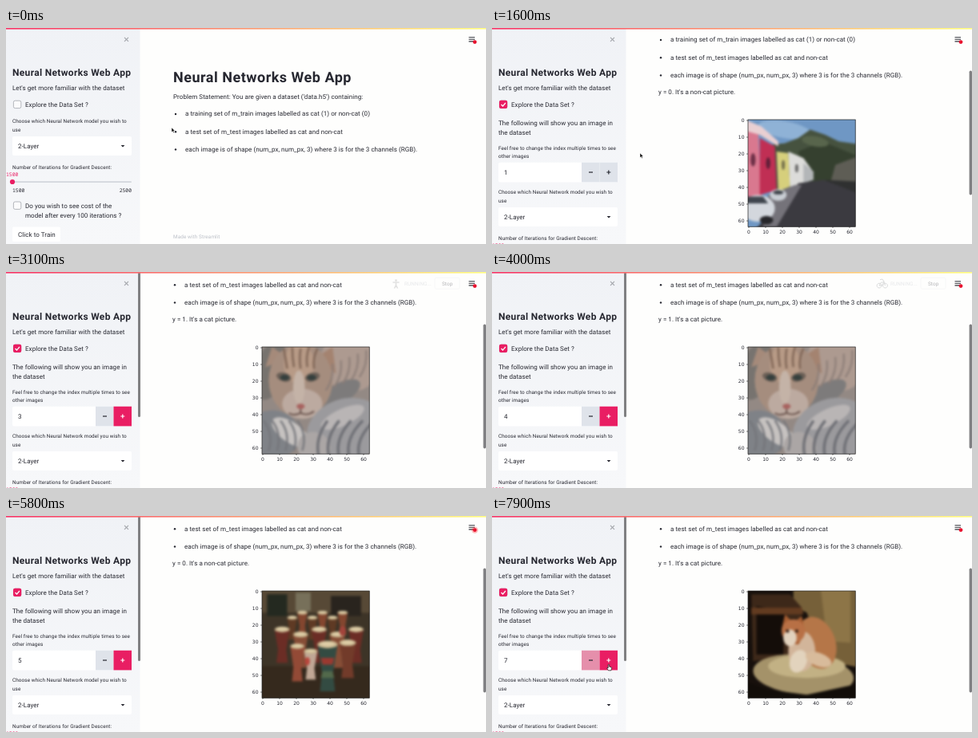
An HTML page for the animation above (8000 ms loop, 600 px wide and 271 px high).

```html
<!DOCTYPE html>
<html lang="en">
<head>
<meta charset="utf-8">
<title>Neural Networks Web App</title>
<style>
  html, body { margin: 0; width: 100%; height: 100%; overflow: hidden; background: #fefefd; }
  svg { display: block; width: 600px; height: 271px; }
  text { font: 8px Roboto, sans-serif; letter-spacing: .055px; fill: #262730; white-space: pre; text-rendering: geometricPrecision; }
  .h1 { font-size: 18px; font-weight: 700; letter-spacing: .5px; }
  .h2 { font-size: 12px; font-weight: 700; letter-spacing: .32px; }
  .small { font-size: 6.4px; letter-spacing: .09px; }
  .mono { font: 6.4px "Noto Sans Mono", "DejaVu Sans Mono", monospace; letter-spacing: 0; }
  .tick { font: 6px "DejaVu Sans", sans-serif; letter-spacing: 0; }
  .pink { fill: #e91e63; }
  .pale { fill: #bcc0c8; }
  .end { text-anchor: end; }
  .mid { text-anchor: middle; }
</style>
</head>
<body>
<svg id="stage" viewBox="0 0 600 271"></svg>
<script>
const LOOP = 8000, STEP = 100, PINK = '#e91e63';

const text = (x, y, s, cls = '') => `<text x="${x}" y="${y}" class="${cls}">${s}</text>`;
const rect = (x, y, w, h, fill, extra = '') =>
  `<rect x="${x}" y="${y}" width="${w}" height="${h}" fill="${fill}" ${extra}/>`;
const line = (d, color, w = 1) => `<path d="${d}" fill="none" stroke="${color}" stroke-width="${w}"/>`;
const group = (id, body, extra = '') => `<g id="${id}" ${extra}>${body}</g>`;
const box = y => rect(9.4, y, 9.4, 9.4, '#fbfbfc', 'rx="2" stroke="#a3a6ad" stroke-width=".8"');

// Picture parts on a 64 x 64 grid: polygons and tilted ellipses
const poly = (fill, points) => `<polygon fill="${fill}" points="${points}"/>`;
const oval = (fill, x, y, rx, ry, turn = 0) =>
  `<ellipse fill="${fill}" cx="${x}" cy="${y}" rx="${rx}" ry="${ry}" transform="rotate(${turn} ${x} ${y})"/>`;
const ground = fill => rect(-4, -4, 72, 72, fill);

function street() {
  return ground('#6f97c4') +
    oval('#8fb2d6', 22, 6, 16, 5, 10) +
    poly('#46523f', '14,15 22,14 30,11 37,6 46,9 54,13 68,15 68,42 14,42') +
    poly('#35402f', '30,19 44,13 66,22 66,38 32,37') + oval('#58654c', 40, 13, 8, 3, 10) +
    poly('#d9788f', '-4,2 6,5 8,47 -4,50') +
    poly('#e9cfd2', '-4,-1 8,4 18,13 18,16 7,9 -4,6') +
    poly('#c02f54', '7,11 16,16 17,42 7,45') +
    poly('#d6cf7c', '17,19 24,20 25,40 18,43') +
    poly('#dcdcda', '24,19 33,23 38,30 38,36 25,41') +
    poly('#b3b6b8', '33,26 39,31 39,36 33,38') +
    poly('#5e5d55', '52,27 68,21 68,46 49,38') + poly('#2f3030', '46,36 66,37 66,45 50,41') +
    poly('#3b3a40', '30,38 45,36 68,45 68,68 2,68') +
    poly('#75737a', '12,45 28,39 32,39 17,64 9,64') +
    oval('#6d3047', 3, 24, 1.5, 4) + oval('#5f1f38', 12, 26, 1.3, 3.5) +
    oval('#74704a', 21, 27, 1, 3) + oval('#6b6b6b', 29, 29, 1, 2.5) +
    oval('#c9ced4', 18, 45, 5, 3.5) + oval('#3d4248', 18, 43.5, 3, 1.2) +
    oval('#d3d7dd', 6, 53, 10, 8) + poly('#3f454e', '-2,46 9,46 12,50 -2,50') +
    oval('#26262a', 11, 60, 4, 2.5);
}

function tabby() {
  let s = ground('#938984') +
    oval('#ad9a90', 52, 10, 18, 16, 30) + oval('#7d7b7b', 46, 28, 14, 6, -30) +
    oval('#77736f', 5, 14, 9, 18, 15) + poly('#a58a7a', '2,12 6,0 16,7') + poly('#a48370', '31,7 42,0 44,16') +
    oval('#a58d7e', 23, 20, 19, 22) + oval('#b79a86', 22, 10, 9, 12) +
    oval('#bcaaa0', 24, 34, 12, 9) + oval('#c4b3a7', 22, 24, 3.5, 10) +
    oval('#9b9a9d', 50, 50, 24, 19, -20) + oval('#b9b5b5', 48, 42, 14, 5, -25) +
    oval('#7f8287', 7, 52, 16, 14, 15) + oval('#c6c2c0', 17, 51, 13, 6, 35) +
    oval('#aba6a5', 31, 60, 10, 9, 20);
  for (let i = 0; i < 5; i++)
    s += line(`M${15 + i * 4} ${13 - i % 2} q-1 -6 ${i - 2} -12`, '#7c6253', 1.1) +
      line(`M${34 + i * 6} 66 q-3 -11 ${5 + i} -22`, '#6d6e74', 1.6) +
      line(`M${1 + i * 5} 44 q6 8 3 18`, '#74757a', 1.1) +
      line(`M${38 + i * 5} ${26 - i * 2} q5 -7 4 -16`, '#8b7d77', 1);
  return s + oval('#6a5f56', 13, 18, 4.5, 2.6, 15) + oval('#6a5f56', 30, 18, 4.5, 2.6, -15) +
    oval('#353f3d', 13.5, 18.3, 2.8, 1.7) + oval('#353f3d', 29.5, 18.3, 2.8, 1.7) +
    oval('#a8625f', 23, 35.5, 2.4, 1.6) + line('M23 37 v2.5 q-4 2 -7 0 M23 39.5 q4 2 8 -1', '#665049', .9);
}

function lily() {
  return ground('#0b0e08') +
    oval('#22371b', 8, 14, 5, 12, -25) + oval('#2c4721', 52, 57, 4, 14, 60) +
    oval('#26401c', 18, 56, 4, 15, 50) + oval('#1c2f16', 34, 59, 10, 4, 10) +
    oval('#4e7134', 33, 11, 3.5, 10, 12) + oval('#3a5a29', 30, 5, 2, 8, -10) +
    oval('#718c42', 26, 20, 5.5, 8, -35) + oval('#a5b268', 28, 19, 2, 6, -35) +
    oval('#a7b467', 10, 32, 5.5, 14, -28) + oval('#e0dcae', 11, 32, 2.6, 11, -28) +
    oval('#b9bba0', 25, 30, 10, 3.5, 15) + oval('#e2dedb', 26, 29, 8, 2, 15) +
    oval('#d4d0cd', 53, 27, 12, 4, -8) + oval('#eeeae8', 50, 25.5, 10, 2, -10) +
    oval('#c9c6c0', 33, 48, 5, 14, 12) + oval('#eae6df', 33, 46, 2.8, 12, 12) +
    oval('#d2cec9', 49, 39, 12, 5, 22) + oval('#eeebe8', 44, 38, 8, 3.5, 15) +
    oval('#e6e3d6', 36, 35, 8, 5, 20) + oval('#a3ad6f', 35, 36, 5, 2, 25) +
    oval('#7c2630', 44, 29, 4, 1.8, -25) + oval('#9a3b40', 53, 31, 4.5, 2, 20) +
    oval('#752530', 48, 35, 5.5, 1.7, 15);
}

function drum(x, y, w, h, body) {
  return poly(body, `${x - w},${y} ${x + w},${y} ${x + w * .55},${y + h * .6} ${x + w * .75},${y + h} ` +
    `${x - w * .75},${y + h} ${x - w * .55},${y + h * .6}`) +
    oval('#c7b58e', x, y, w, w * .38) + oval('#dfcea7', x, y - .3, w * .75, w * .23);
}

function drums() {
  let s = ground('#3d3427') + rect(-4, -4, 72, 17, '#574936') + rect(-4, 45, 72, 24, '#35291d') +
    rect(3, 2, 12, 13, '#242920') + rect(20, 1, 9, 11, '#77705a') + rect(41, 3, 18, 12, '#29241e');
  for (let i = 0; i < 6; i++) s += drum(18 + i * 6, 16 - i % 2 * 3, 3, 13, i % 2 ? '#83462f' : '#5f3a24');
  for (let i = 0; i < 5; i++) s += drum(12 + i * 11, 23 + i % 2 * 3, 4.5, 20, i % 2 ? '#864d36' : '#6b2d25');
  return s + drum(21, 33, 4.2, 21, '#934a36') + drum(29, 36, 4, 17, '#c0a795') +
    drum(51, 31, 5, 21, '#723b2a') + drum(39, 32, 6, 28, '#334b42') +
    poly('#9a3930', '35,40 43,40 42,44 36,44') + poly('#52694b', '36,48 42,48 43,52 35,52') +
    oval('#b8463c', 27, 42, 1.5, 2.5) + oval('#a2443b', 48, 24, 2, 3);
}

function ginger() {
  return ground('#17100c') +
    poly('#766039', '27,-4 68,-4 68,46 46,42 35,13 27,9') +
    poly('#8d7547', '43,-4 61,-4 61,31 47,30') +
    poly('#3d2819', '2,2 25,2 32,10 29,38 3,42') +
    poly('#140d09', '5,9 22,12 21,38 5,38') + poly('#623b20', '2,10 32,10 33,14 2,14') +
    oval('#a49269', 33, 50, 30, 12, 5) + oval('#c2b184', 35, 45, 23, 7) +
    oval('#b57648', 41, 31, 11, 16, -20) + oval('#d2b59a', 32, 36, 8, 12) +
    poly('#a65e32', '20,23 22,14 27,19 32,15 34,25 30,32 22,31') +
    oval('#b87045', 27, 24, 7, 7) + oval('#e1d1bd', 25, 28, 4, 5) +
    oval('#e2d3bd', 30, 42, 5, 7, 20) + oval('#d8bb9b', 42, 41, 8, 4, 20) +
    oval('#392116', 23.5, 24, 1, 1) + oval('#392116', 29, 24, 1, 1) +
    poly('#120d09', '-4,53 12,59 35,62 68,55 68,68 -4,68');
}

const pictures = [
  { at: 0, draw: street, cat: 0 }, { at: 2600, draw: tabby, cat: 1 }, { at: 4400, draw: lily, cat: 0 },
  { at: 5500, draw: drums, cat: 0 }, { at: 7500, draw: ginger, cat: 1 }
];
const runs = [[600, 900], [2200, 2600], [3000, 3500], [3900, 4400], [5000, 5500], [6100, 6800], [7100, 7500]];

// Tables of time and values, linear between rows
const scrollTrack = [[1200, 0], [1400, 46], [1600, 93], [1700, 108], [1800, 114]];
const cursorTrack = [[0, 207, 125], [200, 185, 121], [500, 15, 96], [900, 15, 96], [1200, 185, 157],
  [1700, 185, 157], [2100, 146, 186], [7700, 118, 184], [7800, 125, 185], [7900, 146, 186]];

function track(rows, t) {
  const i = rows.findIndex(r => r[0] > t);
  if (i === 0) return rows[0].slice(1);
  if (i < 0) return rows[rows.length - 1].slice(1);
  const [a, b] = [rows[i - 1], rows[i]], k = (t - a[0]) / (b[0] - a[0]);
  return a.slice(1).map((v, n) => v + (b[n + 1] - v) * k);
}

function plot() {
  let s = '<g transform="translate(320 208) scale(2.1)" clip-path="url(#photo)"><g filter="url(#soft)">';
  pictures.forEach((p, i) => s += group('pic' + i, p.draw()));
  s += '</g></g>' + rect(320, 208, 134.2, 134.2, 'none', 'stroke="#222" stroke-width=".7"');
  for (let n = 0; n <= 60; n += 10) {
    const d = n * 2.1 + 1;
    s += line(`M318 ${208 + d} h2 M${320 + d} 342 v2`, '#222', .6) +
      text(315.5, 210.2 + d, n, 'tick end') + text(320 + d, 351.4, n, 'tick mid');
  }
  return group('plot', s);
}

function mainPane() {
  const items = ['a training set of m_train images labelled as cat (1) or non-cat (0)',
    'a test set of m_test images labelled as cat and non-cat',
    'each image is of shape (num_px, num_px, 3) where 3 is for the 3 channels (RGB).'];
  return group('page',
    group('copy', text(209, 68.4, 'Neural Networks Web App', 'h1') +
      text(209, 88.6, "Problem Statement: You are given a dataset ('data.h5') containing:") +
      items.map((s, i) => `<circle cx="212" cy="${108 + i * 22.2}" r="1.2" fill="#262730"/>` +
        text(224, 110.3 + i * 22.2, s)).join('')) +
    group('result', '<text id="verdict" x="208" y="175.6"></text>' + plot())) +
    group('credit', text(209, 264.2, 'Made with Streamlit', 'small pale')) +
    rect(596.6, 0, 3.4, 156, '#808082', 'id="thumb" rx="1.7"');
}

function numberInput() {
  return rect(8, 168.7, 149, 24.7, '#fff', 'rx="2"') +
    '<text id="value" x="15" y="184"></text>' +
    rect(112, 168.7, 22.5, 24.7, '#dfe3ea', 'id="minus"') + rect(134.5, 168.7, 22.5, 24.7, '#dfe3ea', 'id="plus"') +
    line('M121 181 h5', '#262730', 1.2) +
    group('plusSign', '<path d="M143.3 181 h5 M145.8 178.5 v5" fill="none" stroke-width="1.2"/>');
}

function sidebar() {
  const explore = text(8, 121.6, 'The following will show you an image in') + text(8, 133.8, 'the dataset') +
    text(8, 152.6, 'Feel free to change the index multiple times to see', 'small') +
    text(8, 162.6, 'other images', 'small') + numberInput();
  const lower = text(8, 119.4, 'Choose which Neural Network model you wish to', 'small') +
    text(8, 129.6, 'use', 'small') + rect(8, 136, 149, 24, '#fff', 'rx="2"') + text(15, 151, '2-Layer') +
    poly('#262730', '143.6,147 148.4,147 146,149.6') +
    text(8, 177.4, 'Number of Iterations for Gradient Descent:', 'small') +
    text(0, 186.4, '1500', 'mono pink') + rect(8, 192.2, 149, 1.8, '#d3d6dd', 'rx=".9"') +
    `<circle cx="8" cy="193" r="3.1" fill="${PINK}"/>` +
    text(8, 205.6, '1500', 'mono') + text(157, 205.6, '2500', 'mono end') +
    box(218) + text(24, 225.6, 'Do you wish to see cost of the') +
    text(24, 237.8, 'model after every 100 iterations ?') +
    rect(8, 249.5, 60, 18.5, '#fff', 'rx="2"') + text(15, 261.6, 'Click to Train');
  return rect(0, 0, 167.5, 271, 'url(#panel)') + line('M148 11.8 l5 5 m0 -5 l-5 5', '#a2a4aa', 1.1) +
    text(8, 60.3, 'Neural Networks Web App', 'h2') +
    text(8, 78.2, "Let's get more familiar with the dataset") + box(91.2) +
    group('tickOn', rect(9, 90.8, 10.2, 10.2, PINK, 'rx="2"') + line('M11.5 96 l2 2 l3.4 -4', '#fff', 1.2)) +
    text(24, 98.6, 'Explore the Data Set ?') + group('explore', explore) + group('lower', lower) +
    rect(165, 0, 3, 182, '#808082', 'id="sideThumb" rx="1.5"');
}

function header() {
  const person = '<circle cx="487.5" cy="10.6" r="1.4" fill="#aaa"/>' +
    line('M483.5 13 h8 M487.5 12.5 v4 l-2 4 M487.5 16.5 l2 4', '#aaa', 1.6);
  const bike = line('M484 14.2 a2.9 2.9 0 1 0 .01 0 M491.5 14.2 a2.9 2.9 0 1 0 .01 0 ' +
    'M484 17 l2.4 -4 h3.6 l-2.6 4 z M491.5 17 l-2 -6 M485 9.6 l3 -.6 l2 3', '#8d8f94', .9);
  return group('status', rect(478, 4, 92, 20, '#fefefd') + group('person', person) + group('bike', bike) +
      text(498, 17.2, 'RUNNING...', 'small pale') +
      rect(536, 7.2, 31, 14, '#fff', 'rx="2" stroke="#e3e5e9" stroke-width=".7"') +
      text(551.7, 17, 'Stop', 'small mid')) +
    line('M578.5 11.7 h7.5 M578.5 14.3 h7.5 M578.5 16.9 h7.5', '#33343c', 1.1) +
    '<circle id="glow" cx="586" cy="17.6" r="4.2" fill="#ff2b2b" opacity=".3"/>' +
    '<circle cx="586" cy="17.6" r="2.4" fill="#e8132f"/>' +
    rect(0, 0, 600, 1.6, 'url(#ribbon)');
}

const pointers =
  group('arrow', '<path d="M0 0 v5.6 l1.4 -1.1 l1 2 l.9 -.4 l-.9 -2 h1.7 z" fill="#111" stroke="#fff" stroke-width=".4"/>') +
  group('hand', '<path d="M-.8 .6 q.8 -1 1.5 0 v2.5 l2.5 .7 q.6 .4 .3 1.7 l-.6 2.3 h-3.4 l-2 -3 q0 -.9 1.7 0 z" ' +
    'fill="#fff" stroke="#111" stroke-width=".7"/>');

document.getElementById('stage').innerHTML = `<defs>
  <linearGradient id="ribbon"><stop stop-color="#f63366"/><stop offset="1" stop-color="#fffd80"/></linearGradient>
  <linearGradient id="panel" x2="0" y2="1"><stop stop-color="#f0f2f6"/><stop offset="1" stop-color="#f7f8fa"/></linearGradient>
  <clipPath id="photo"><rect width="64" height="64"/></clipPath>
  <filter id="soft" x="-4" y="-4" width="72" height="72" filterUnits="userSpaceOnUse"
    color-interpolation-filters="sRGB"><feGaussianBlur stdDeviation=".7"/></filter>
  </defs>` + rect(0, 0, 600, 271, '#fefefd') + mainPane() + sidebar() + header() + pointers;

const el = {};
document.querySelectorAll('[id]').forEach(n => el[n.id] = n);
const show = (id, on) => el[id].style.display = on ? '' : 'none';
const move = (id, x, y) => el[id].setAttribute('transform', `translate(${x} ${y})`);
const clamp = v => Math.min(1, Math.max(0, v));

function render(t) {
  const open = t >= 700, ready = t >= 900;
  const [scroll] = track(scrollTrack, t);
  const [x, y] = track(cursorTrack, t);
  move('page', 0, -scroll);
  move('copy', ready ? -1 : 0, 0);
  show('result', ready);
  show('credit', !ready);
  show('thumb', ready);
  el.thumb.setAttribute('y', scroll * .575);

  show('tickOn', t >= 600);
  show('explore', open);
  show('sideThumb', open && x < 168);
  move('lower', 0, open ? 89 : 0);
  el.value.textContent = Math.max(1, runs.filter(r => t >= r[0]).length);

  const shown = pictures.filter(p => t >= p.at).length - 1;
  pictures.forEach((p, i) => show('pic' + i, i === shown));
  el.verdict.textContent = pictures[shown].cat ? "y = 1. It's a cat picture." : "y = 0. It's a non-cat picture.";

  // Status fades in early in a run; old content fades later
  const n = runs.findIndex(([a, b]) => t >= a && t < b + 100);
  let status = 0, fade = 1;
  if (n >= 0) {
    const [a, b] = runs[n];
    status = t < b ? clamp((t - a) / 300) : .4;
    if (t < b) fade = 1 - .5 * clamp((t - a - 200) / 300);
  }
  el.status.style.opacity = status;
  show('person', n % 2 === 0);
  show('bike', n % 2 !== 0);
  el.plot.style.opacity = el.lower.style.opacity = fade;

  const onPlus = t >= 2100;
  el.plus.setAttribute('fill', onPlus ? PINK : '#dfe3ea');
  el.plusSign.setAttribute('stroke', onPlus ? '#fff' : '#262730');
  el.minus.setAttribute('fill', t >= 7900 ? '#e58fab' : t >= 7800 ? PINK : '#dfe3ea');

  const seen = t < 2300 || t >= 7700;
  const over = (t >= 500 && t <= 900) || t >= 2100;
  show('arrow', seen && !over);
  show('hand', seen && over);
  move('arrow', x, y);
  move('hand', x, y);
  show('glow', t >= 5700 && t < 6700);
}

function tick(now) {
  render(Math.floor(now % LOOP / STEP) * STEP);
  requestAnimationFrame(tick);
}
render(0);
requestAnimationFrame(tick);
</script>
</body>
</html>
```
